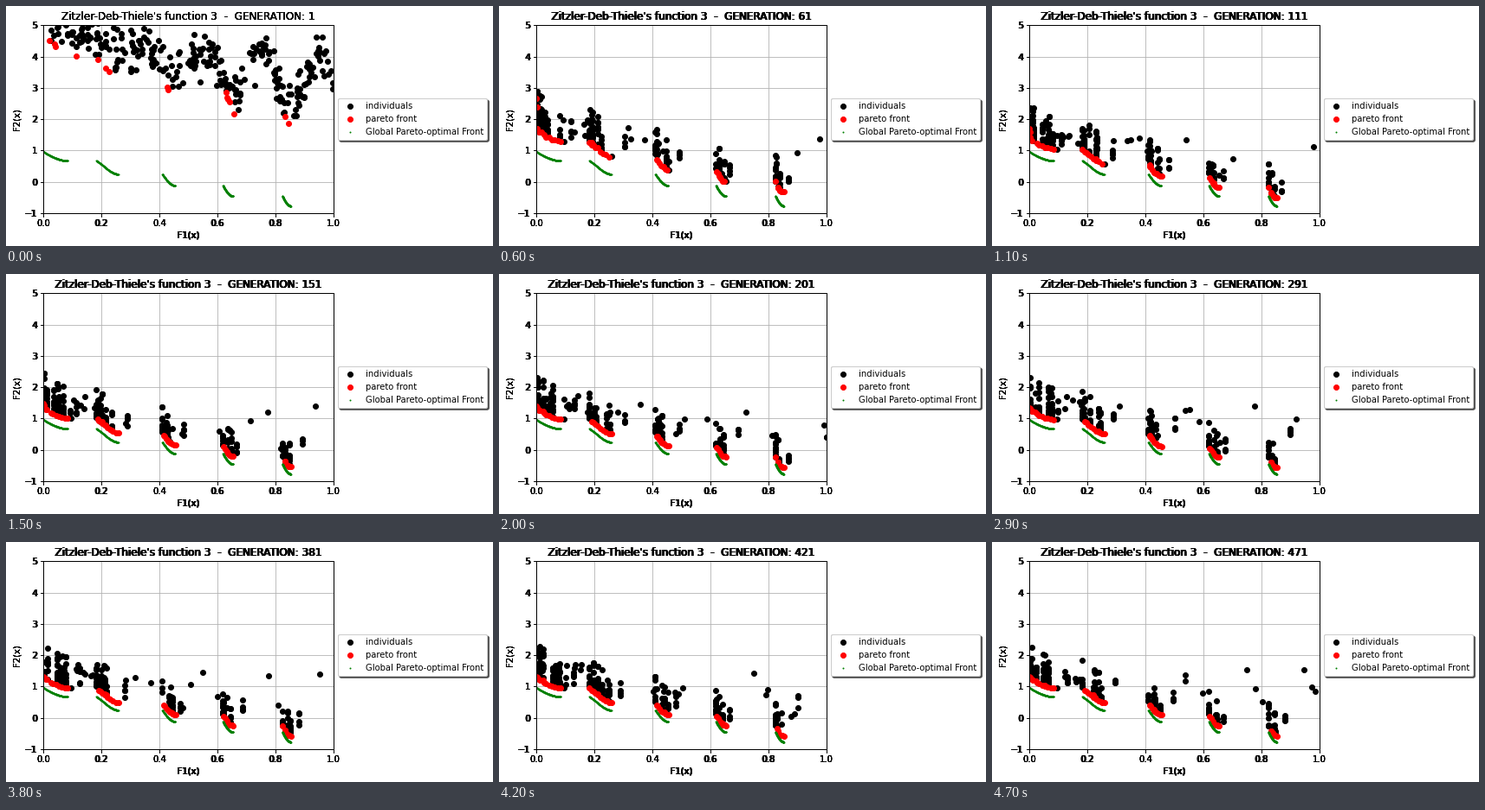
Animation of 562x278 px, one loop 4.8 s. Source, as a matplotlib script:

```python
import numpy as np
import matplotlib.pyplot as plt
from matplotlib.animation import FuncAnimation

W, H, DPI = 562, 278, 72
FRAMES, INTERVAL = 48, 100

# Layers are stacked half a pixel apart, which thickens the text
LEFTS = (43.4, 42.85, 43.4, 42.85, 43.4)
BOTTOM, WIDTH, HEIGHT = 38.16, 334.8, 217.44

# Pieces of the optimal front: low x, high x
PIECES = [(0.001, 0.083), (0.1823, 0.2577), (0.4093, 0.4538),
          (0.6183, 0.6525), (0.8233, 0.8518)]
CROWD = (85, 55, 34, 28, 24)


def zdt3(x, g):
    return g - np.sqrt(x * g) - x * np.sin(10 * np.pi * x)


def points(x, g):
    return np.column_stack([x, zdt3(x, g)])


def best_g(n):
    return 1.3 + 0.15 * np.exp(-n / 20) + 3.1 * np.exp(-n / 2.5)


def elite(n):
    """Slowly improving points, the same x positions in every generation."""
    rng = np.random.default_rng(3)
    x = np.concatenate([np.linspace(lo + 0.003, hi, 9) for lo, hi in PIECES])
    x = np.append(x + rng.normal(0, 0.0015, x.size), 0.095)
    g = best_g(n) + np.abs(rng.normal(0, 0.01 + 0.1 * np.exp(-n / 4), x.size))
    # steep tail next to the axis
    tail = best_g(n) + 4.3 * np.exp(-n / 4) * np.linspace(0, 1, 5)
    return np.vstack([points(x, g), points(np.linspace(0.002, 0, 5), tail)])


def offspring(n):
    """Columns above each piece, plus scattered stragglers."""
    rng = np.random.default_rng(100 + n)
    spread = 0.36 + 0.35 * np.exp(-n / 3)
    xs, gs = [], []
    for (lo, hi), count in zip(PIECES, CROWD):
        parents = rng.uniform(lo, hi, 3 + count // 15)
        parents[0] = lo
        xs.append(rng.choice(parents, count))
        gs.append(np.minimum(rng.exponential(spread, count), 3 * spread))
        # one column that drifted off the piece
        xs.append(np.full(4, hi + rng.uniform(0.01, 0.05)))
        gs.append(rng.uniform(0.05, 0.7, 4))
    for lo, hi, count in ((0.09, 0.18, 7), (0.27, 1.0, 10)):
        xs.append(rng.uniform(lo, hi, count))
        gs.append(rng.uniform(0.1, 0.8, count))
    return points(np.concatenate(xs), best_g(n) + 0.03 + np.concatenate(gs))


def population(n):
    if n == 0:
        rng = np.random.default_rng(7)
        return points(rng.uniform(0, 1, 300), rng.normal(5.5, 0.47, 300))
    return np.vstack([offspring(n), elite(n)])


def split_front(pop):
    """Return the dominated and the non-dominated points."""
    order = pop[np.lexsort((pop[:, 1], pop[:, 0]))]
    lowest = np.minimum.accumulate(order[:, 1])
    best = np.append(True, order[1:, 1] < lowest[:-1])
    return order[~best], order[best]


def add_layer(fig, left, handles=None):
    box = (left / W, BOTTOM / H, WIDTH / W, HEIGHT / H)
    ax = fig.add_axes(box, label=f"layer {len(fig.axes)}")
    ax.set(xlim=(0, 1), ylim=(-1, 5), xlabel="F1(x)", ylabel="F2(x)")
    ax.set_yticks(range(-1, 6))
    if handles:
        ax.patch.set_visible(False)
        ax.legend(handles=handles, loc="center left",
                  bbox_to_anchor=(1, 0.5), shadow=True)
    return ax


plt.rcParams["font.family"] = "DejaVu Sans"
fig = plt.figure(figsize=(W / DPI, H / DPI), dpi=DPI, facecolor="white")
base = add_layer(fig, LEFTS[0])
base.grid(True)
base.set_axisbelow(True)

black, = base.plot([], [], "ko", label="individuals")
red, = base.plot([], [], "ro", label="pareto front")
gx = np.concatenate([np.linspace(lo, hi, 100) for lo, hi in PIECES])
green, = base.plot(gx, zdt3(gx, 1), "g.", markersize=2,
                   label="Global Pareto-optimal Front")

layers = [base] + [add_layer(fig, left, [black, red, green])
                   for left in LEFTS[1:]]
titles = [ax.set_title("") for ax in layers]


def update(n):
    rest, front = split_front(population(n))
    black.set_data(*rest.T)
    red.set_data(*front.T)
    for title in titles:
        title.set_text("Zitzler-Deb-Thiele's function 3  -  "
                       f"GENERATION: {1 + 10 * n}")
    return [black, red, *titles]


anim = FuncAnimation(fig, update, frames=FRAMES, interval=INTERVAL,
                     repeat=True, repeat_delay=0)
plt.show()
```
